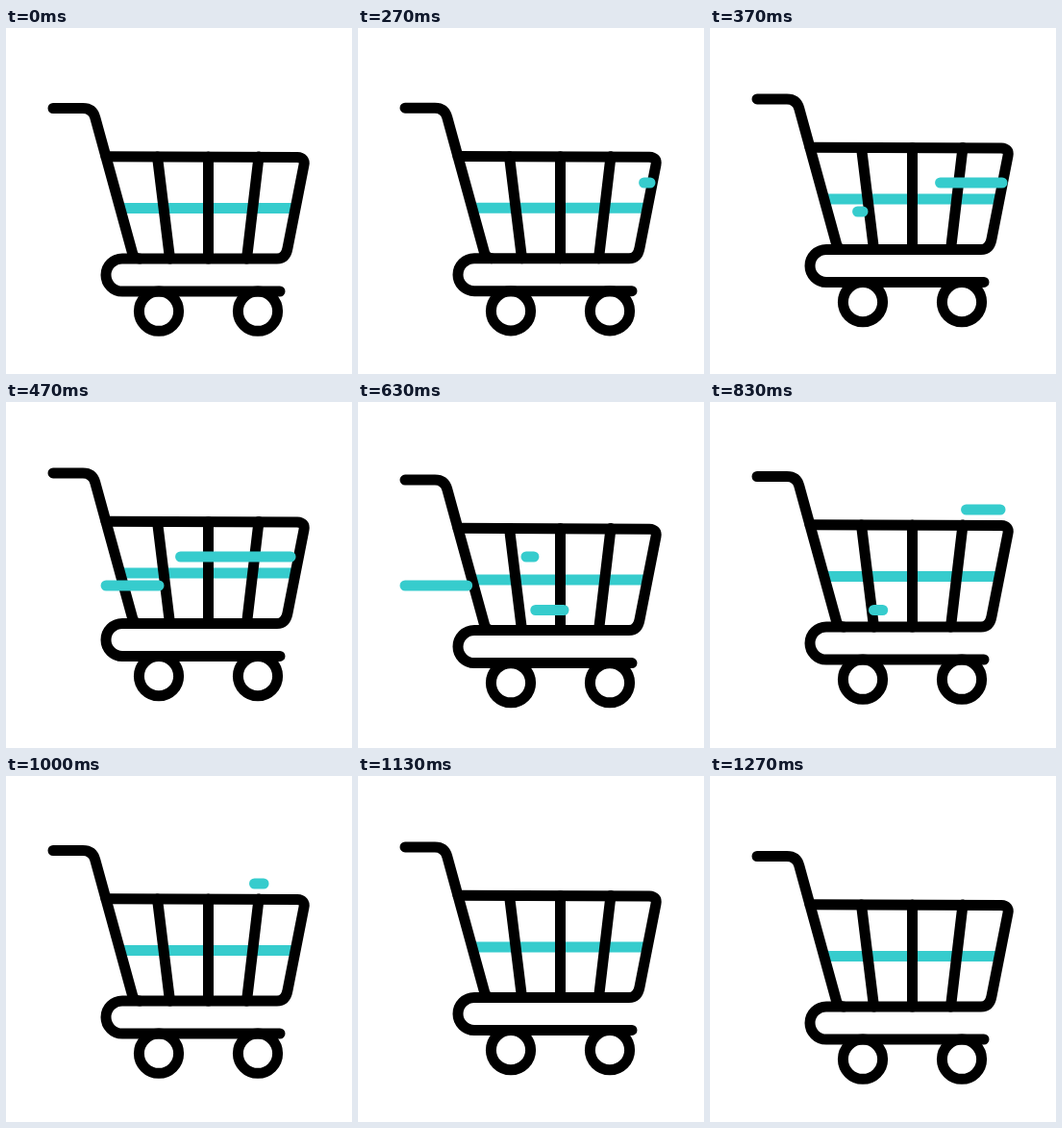
An HTML page for the animation above (1.67 s loop, 360 by 360 pixels).

```html
<!DOCTYPE html>
<html lang="en">
<head>
<meta charset="utf-8">
<title>Shopping cart</title>
<style>
  html, body { margin: 0; width: 100%; height: 100%; overflow: hidden; background: #fff; }
  svg { display: block; width: 100%; height: 100%; }
  .ink, .teal { fill: none; stroke-width: 11; stroke-linecap: round; stroke-linejoin: round; }
  .ink { stroke: #000; }
  .teal { stroke: #36cccd; }
</style>
</head>
<body>
<svg viewBox="0 0 360 360">
  <g id="cart">
    <path class="teal" d="M121 187.5H299" stroke-linecap="butt"/>
    <g class="ink">
      <path d="M49 83.5H80Q90 83.5 92.7 93L131.5 234Q133 240 139 240"/>
      <path d="M104 133.7L303 134.6Q311.5 135 310 142.5L293 229Q291 240 282 240H121A17 17 0 0 0 121 274H285"/>
      <path d="M157.5 134L170.5 240M210.5 134V240M263 134L250.5 240"/>
      <circle cx="159" cy="294.7" r="20.6"/>
      <circle cx="262" cy="294.7" r="20.6"/>
    </g>
  </g>
  <g id="dashes" class="teal"></g>
</svg>
<script>
  const LOOP = 1670, START = 270, STEP = 1000 / 30, STEPS = 30;
  const BOB = { height: 12, period: 10, shift: 0.5 };

  // Each dash runs leftwards; delays are in steps.
  const dashes = [
    { y: 161, from: 304, to: 175, delay: 0 },
    { y: 191, from: 159, to: 49, delay: 3 },
    { y: 216.5, from: 214, to: 170.5, delay: 6.85 },
    { y: 112, from: 302, to: 258.5, delay: 11.9 }
  ];

  const cart = document.getElementById('cart');
  const layer = document.getElementById('dashes');
  for (const dash of dashes) {
    dash.path = document.createElementNS('http://www.w3.org/2000/svg', 'path');
    layer.append(dash.path);
  }

  const progress = (step, start, length) =>
    Math.min(1, Math.max(0, (step - start) / length));

  function drawDash({ y, from, to, delay, path }, step) {
    const head = progress(step, delay - 0.33, 6.67);
    const tail = progress(step, delay + 5.65, 5.7);
    const x = p => from + (to - from) * p;
    const visible = head > 0 && tail < 1;
    path.setAttribute('d', visible ? `M${x(tail)} ${y}H${x(head)}` : '');
  }

  function draw(now) {
    const t = now % LOOP;
    const step = t < START ? -1 : Math.floor((t - START + 6.7) / STEP);
    const moving = step >= 0 && step < STEPS;
    const angle = 2 * Math.PI * (step + BOB.shift) / BOB.period;
    const lift = moving ? BOB.height * (1 - Math.cos(angle)) / 2 : 0;
    cart.setAttribute('transform', `translate(0 ${-lift})`);
    for (const dash of dashes) drawDash(dash, step);
  }

  const origin = performance.now();
  function tick() {
    draw(performance.now() - origin);
    requestAnimationFrame(tick);
  }
  tick();
</script>
</body>
</html>
```
